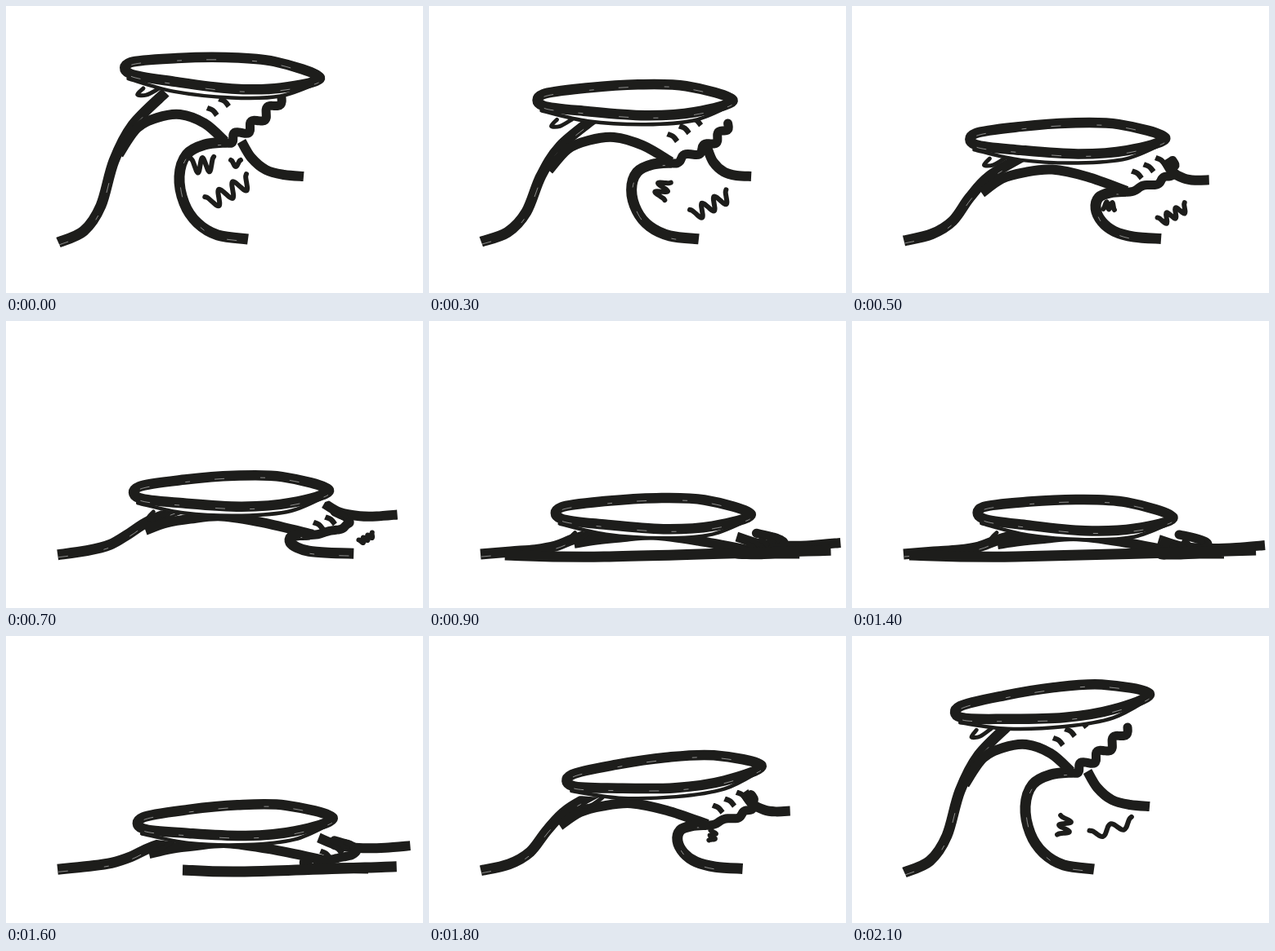
An HTML page with a canvas that plays this animation: 510x352 px, repeating every 2.2 s.

```html
<!DOCTYPE html>
<html lang="en">
<head>
<meta charset="utf-8">
<title>Wave and board</title>
<style>
html, body { margin: 0; width: 100%; height: 100%; overflow: hidden; background: #fff; }
canvas { display: block; }
</style>
</head>
<body>
<canvas id="stage" width="510" height="352"></canvas>
<script>
const ctx = document.getElementById('stage').getContext('2d');
const INK = '#1d1d1b', PAPER = '#fff';
const LOOP = 2200, STEP = 100;

const pts = s => s.split(' ').map(p => p.split(',').map(Number));
const mix = (a, b, t) => a + (b - a) * t;
const morph = ([a, b], t) => a.map((p, i) => p.map((v, c) => mix(v, b[i][c], t)));
const sample = (n, fn) => Array.from({ length: n + 1 }, (_, i) => fn(i / n));
const ease = s => {
  s = Math.max(0, Math.min(1, s));
  return s * s * (3 - 2 * s);
};

// Each part of the wave, standing and collapsed
const wave = {
  back: ['64,290 95,276 116,245 132,190 155,146 195,106',
         '63,286 100,283 130,281 155,277 180,268 225,256'],
  roof: ['138,182 160,150 185,137 213,133 243,144 268,166',
         '178,274 205,270 235,267 275,264 330,271 400,284'],
  curl: ['270,167 243,170 221,182 212,209 218,242 234,266 259,281 296,286',
         '395,284 385,284 378,284 379,286 388,286 402,286 425,285 455,285'],
  tail: ['288,166 300,186 318,201 340,207 364,209',
         '375,268 405,277 440,279 470,278 505,275'],
  lip:  ['337,112 305,150 267,167', '400,262 475,276 390,285']
};
for (const k in wave) wave[k] = wave[k].map(pts);

// Foam squiggles: full size at time t, drifting by vx, vy and shrinking away over life
const foams = [
  { t: 0, x: 241, y: 195, vx: .147, vy: .1, life: 700, angle: -5, spin: .38, len: 28, amp: 9, waves: 2 },
  { t: 0, x: 273, y: 228, vx: .24, vy: .055, life: 850, angle: -29, spin: 0, len: 58, amp: 9, waves: 3 },
  { t: 0, x: 281, y: 193, vx: .1, vy: .04, life: 250, angle: 0, spin: 0, len: 12, amp: 4, waves: 1 },
  { t: 2100, x: 260, y: 233, vx: -.29, vy: -.04, life: 430, angle: 100, spin: 0, len: 24, amp: -7, waves: 2 },
  { t: 2100, x: 318, y: 236, vx: -.2, vy: 0, life: 290, angle: -18, spin: 0, len: 54, amp: 6, waves: 2 }
];

// Sway of the board: time, x of its centre, tilt in degrees
const sway = [
  [0, 268, 2.9], [300, 255.5, 0], [700, 279, -.7], [1100, 276.5, 1.4],
  [1400, 276.5, 1.4], [1800, 291, -4.5], [2100, 248.5, -5.5], [LOOP, 268, 2.9]
];
const hull = pts('-116,-8 -60,-16 0,-20 59,-18 116,-1 69,14 9,18 -61,13 -116,6');
const rail = pts('-118,12 -61,25 9,29 69,24 115,5');
const fin = pts('-99,23 -106,31 -95,31 -81,23');

// Smooth curve through all points
function trace(p, closed) {
  const n = p.length;
  const at = i => closed ? p[(i + n) % n] : p[Math.max(0, Math.min(n - 1, i))];
  ctx.beginPath();
  ctx.moveTo(...p[0]);
  for (let i = 0; i < (closed ? n : n - 1); i++) {
    const [a, b, c, d] = [at(i - 1), at(i), at(i + 1), at(i + 2)];
    ctx.bezierCurveTo(
      b[0] + (c[0] - a[0]) / 6, b[1] + (c[1] - a[1]) / 6,
      c[0] - (d[0] - b[0]) / 6, c[1] - (d[1] - b[1]) / 6, c[0], c[1]);
  }
}

function line(p, width, { cap = 'butt', closed = false, color = INK } = {}) {
  trace(p, closed);
  ctx.lineWidth = width;
  ctx.lineCap = cap;
  ctx.strokeStyle = color;
  ctx.stroke();
}

// Stroke with a few dry-brush hairlines
function brush(p, width, closed) {
  line(p, width, { closed });
  ctx.setLineDash([12, 44, 6, 30]);
  ctx.translate(1, 3);
  line(p, .5, { closed, color: PAPER });
  ctx.translate(-1, -3);
  ctx.setLineDash([]);
}

// 0 = standing wave, 1 = collapsed
const collapse = t => t < 1400
  ? ease((t - 20) / 940)
  : 1 - ease((t - 1400) / 700) ** 1.6;

function drawWave(u) {
  const part = k => morph(wave[k], u);
  const bulge = u * (1 - u), lift = 67 * (u - u ** 4);

  brush(part('back'), 13);
  line(part('roof'), 12);
  brush(part('curl'), 13);
  line(part('tail').map(([x, y], i) => [x + 200 * bulge * (1 - i / 4), y - lift]), 12);

  // Ragged lip: a bent line with a ripple
  const [a, b, c] = part('lip');
  const bend = (s, k) => mix(mix(a[k], b[k], s), mix(b[k], c[k], s), s);
  line(sample(28, s => {
    const ripple = 3.5 * (1 - u) * Math.sin(s * 22);
    return [bend(s, 0) + 90 * bulge * (1 - s) + ripple, bend(s, 1) + ripple];
  }), 11, { cap: 'round' });

  // Shading strokes under the lip
  for (let k = 0; k < 3; k++) {
    const x = 252 + 143 * u + 90 * bulge + 14.5 * k, y = 129 + 150 * u - 11 * k * (1 - u / 2);
    line([[x - 6, y - 4], [x + 1, y - 1], [x + 6, y + 5]], 6.5);
  }

  // Flat water spreading along the ground
  const k = (u - .82) / .18;
  if (k > 0) line([[455 + 39 * k, 285 - 4 * k], [420 - 220 * k, 289], [420 - 350 * k, 287]], 13);
}

function drawFoam(f, t) {
  const dt = t - f.t, size = 1 - (dt / f.life) ** 2;
  if (size <= 0) return;
  ctx.save();
  ctx.translate(f.x + f.vx * dt, f.y + f.vy * dt);
  ctx.rotate((f.angle + f.spin * dt) * Math.PI / 180);
  line(sample(f.waves * 8, s => [
    (s - .5) * f.len * size,
    -Math.cos(s * f.waves * 2 * Math.PI) * f.amp * size
  ]), 6, { cap: 'round' });
  ctx.restore();
}

function drawBoard(t, u) {
  const i = sway.findIndex(k => k[0] > t);
  const a = sway[i - 1], b = sway[i], s = ease((t - a[0]) / (b[0] - a[0]));
  ctx.save();
  ctx.translate(mix(a[1], b[1], s), 83 + 156 * u);
  ctx.rotate(mix(a[2], b[2], s) * Math.PI / 180);
  line(fin, 5, { cap: 'round' });
  ctx.fillStyle = PAPER;
  for (const p of [rail, hull]) {
    trace(p, true);
    ctx.fill();
  }
  line(rail, 4.5, { cap: 'round' });
  brush(hull, 12.5, true);
  ctx.restore();
}

function draw(t) {
  const u = collapse(t);
  ctx.fillStyle = PAPER;
  ctx.fillRect(0, 0, 510, 352);
  ctx.lineJoin = 'round';
  drawWave(u);
  for (const f of foams) drawFoam(f, t);
  drawBoard(t, u);
}

const start = performance.now();
function tick() {
  const t = (performance.now() - start) % LOOP;
  draw(Math.floor(t / STEP) * STEP);
  requestAnimationFrame(tick);
}
tick();
</script>
</body>
</html>
```
